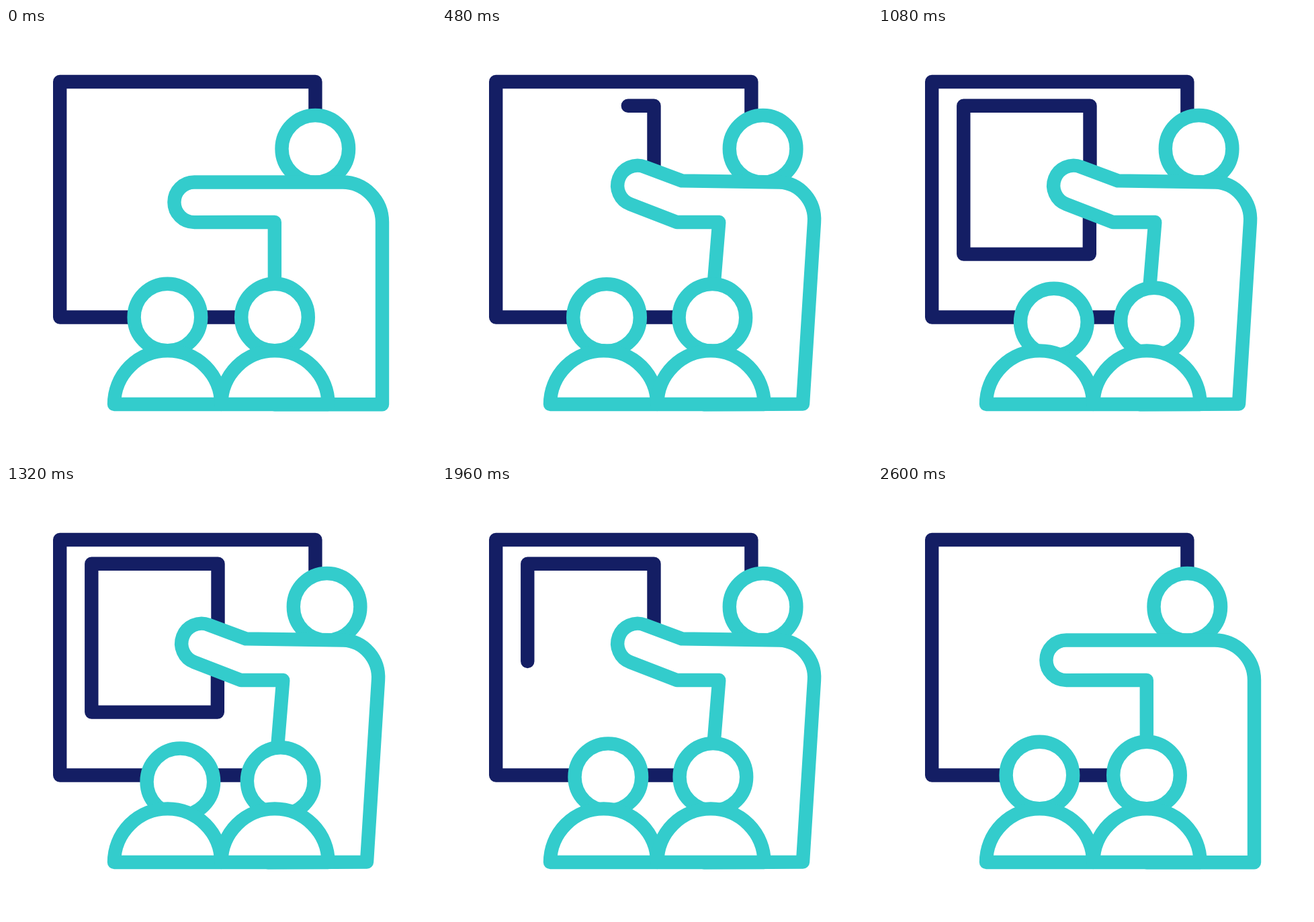
Write an HTML page with a canvas that moves like this. It is 640 px wide and 640 px high and loops after 3000 ms.

```html
<!DOCTYPE html>
<html lang="en">
<head>
<meta charset="utf-8">
<title>Classroom</title>
<style>
html, body { margin: 0; width: 100%; height: 100%; overflow: hidden; background: #fff; }
canvas { display: block; width: 640px; height: 640px; }
</style>
</head>
<body>
<canvas id="stage" width="640" height="640"></canvas>
<script>
const ctx = document.getElementById('stage').getContext('2d');
const NAVY = '#141e64', TEAL = '#33cccc';
const LOOP = 3000, STEP = 40;

const clamp = v => Math.min(1, Math.max(0, v));
const span = (t, a, b) => clamp((t - a) / (b - a));
const smooth = p => p * p * (3 - 2 * p);
const mix = (a, b, k) => a + (b - a) * k;
const easeOut = (p, k) => 1 - Math.pow(1 - p, k);

function shape(color, fill, build) {
  ctx.beginPath();
  build();
  if (fill) { ctx.fillStyle = '#fff'; ctx.fill(); }
  ctx.strokeStyle = color;
  ctx.stroke();
}

function head(x, y) {
  shape(TEAL, true, () => ctx.arc(x, y, 49.8, 0, Math.PI * 2));
}

function shoulders(x) {
  shape(TEAL, true, () => {
    ctx.arc(x, 560, 79.6, Math.PI, 0);
    ctx.closePath();
  });
}

function board() {
  shape(NAVY, false, () => ctx.rect(80.2, 80, 380.2, 350.5));
}

// The sheet is traced from behind the hand, up and round anticlockwise.
function sheet(part) {
  if (part <= 0) return;
  ctx.setLineDash([817.6 * part, 2000]);
  shape(NAVY, false, () => {
    ctx.moveTo(315.5, 230);
    ctx.lineTo(315.5, 115.7);
    ctx.lineTo(127.3, 115.7);
    ctx.lineTo(127.3, 336.6);
    ctx.lineTo(314.8, 336.6);
    ctx.lineTo(315, 230);
  });
  ctx.setLineDash([]);
}

function teacher(k) {
  const m = (a, b) => mix(a, b, k);
  const tilt = m(0, 21 * Math.PI / 180);
  head(m(460.3, 477.6), 179.8);
  shape(TEAL, true, () => {
    ctx.moveTo(m(400, 390), 560.2);
    ctx.lineTo(m(399.8, 412.3), 289);
    ctx.lineTo(m(345, 349.5), 289);
    ctx.arc(m(280.2, 291), m(259.3, 234.5), 29.8, Math.PI / 2 + tilt, Math.PI * 1.5 + tilt);
    ctx.lineTo(m(340, 357), m(229.5, 227.4));
    ctx.lineTo(m(501, 502), 229.5);
    ctx.bezierCurveTo(m(533.5, 533), m(229.5, 230.5), m(560, 556), m(256.5, 258), m(560, 554), 289);
    ctx.lineTo(m(560, 537), m(560.2, 559.6));
    ctx.closePath();
  });
}

// Pupil offsets: look up at the board, glance down, then return.
function pupil(t, x, up, down, k) {
  let dx, dy;
  if (t < 1040) {
    const p = span(t, 400, 920);
    dx = up[0] * easeOut(p, 1.45);
    dy = up[1] * smooth(p);
  } else if (t < 1760) {
    const p = smooth(span(t, 1040, 1640));
    dx = mix(up[0], down[0], p);
    dy = mix(up[1], down[1], p);
  } else {
    const q = 1 - span(t, 1760, 2280);
    dx = down[0] * Math.pow(q, k);
    dy = down[1] * Math.pow(q, 3.3);
  }
  head(x + dx, 430.5 + dy);
}

function draw(t) {
  ctx.fillStyle = '#fff';
  ctx.fillRect(0, 0, 640, 640);
  ctx.lineWidth = 20.4;
  ctx.lineJoin = ctx.lineCap = 'round';

  const lean = smooth(span(t, 80, 400)) - smooth(span(t, 2280, 2600));
  const traced = easeOut(span(t, 400, 920), 1.24) - easeOut(span(t, 1760, 2280), 1.24);

  board();
  sheet(traced);
  teacher(lean);
  pupil(t, 240.4, [21.5, 7], [15.8, 13.2], 1.7);
  pupil(t, 400, [11, 6], [5.8, 11.8], 1.1);
  shoulders(240.6);
  shoulders(400);
}

const start = performance.now();
function tick() {
  const t = (performance.now() - start) % LOOP;
  draw(Math.floor(t / STEP) * STEP);
  requestAnimationFrame(tick);
}
tick();
</script>
</body>
</html>
```
